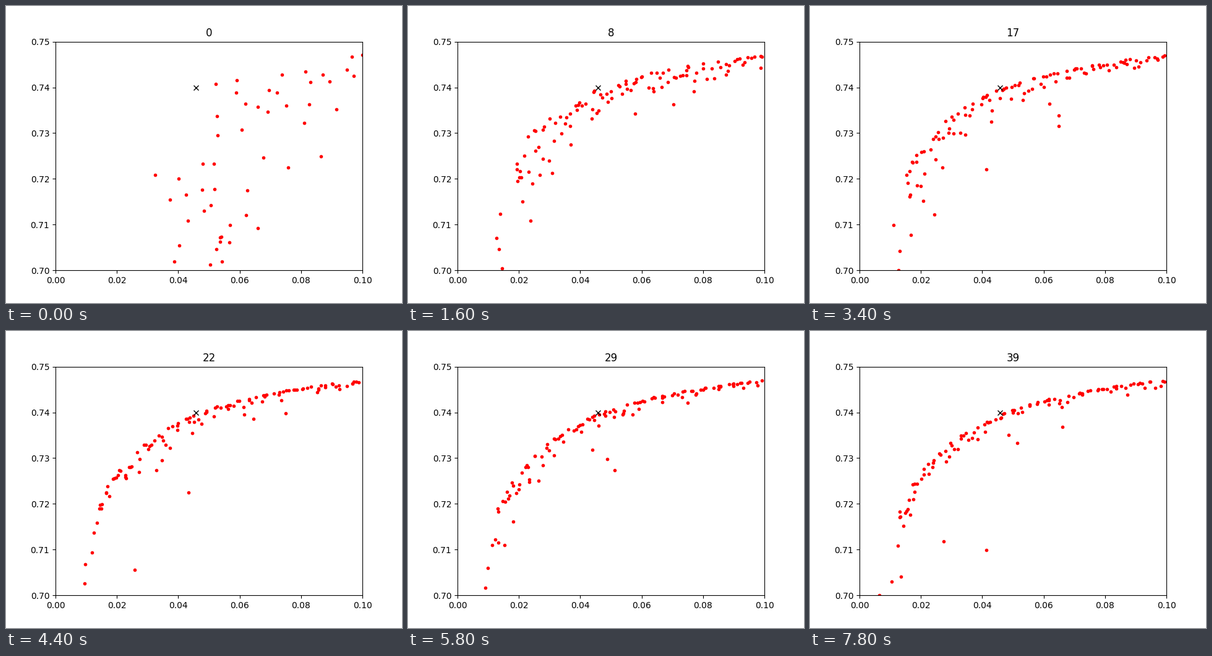
A matplotlib script that plays this animation: 640x480 px, repeating every 8 s.

```python
import numpy as np
import matplotlib.pyplot as plt
from matplotlib.animation import FuncAnimation

GENERATIONS = 40
INTERVAL = 200


def front(x):
    return 0.755 - 0.000878 / (x + 0.0112)


def inverse_front(y):
    return 0.000878 / (0.755 - y) - 0.0112


def slope(x):
    return 0.000878 / (x + 0.0112) ** 2


def spaced(rng, count, low, high):
    """Random values that cover the range without large gaps."""
    steps = (np.arange(count) + rng.uniform(-1, 2, count)) / count
    return low + (high - low) * np.clip(steps, 0, 1)


def first_population(rng):
    low_x = rng.normal(0.048, 0.008, 21)
    low_y = spaced(rng, 21, 0.7, 0.721)
    high_x = spaced(rng, 30, 0.047, 0.1)
    high_y = front(high_x) - rng.exponential(0.006, 30)
    return np.append(low_x, high_x), np.append(low_y, high_y)


def band(rng, gen):
    count = int(50 + 55 * (1 - np.exp(-gen / 3)))
    left = 0.012 + 0.013 * np.exp(-gen / 12) + 0.012 * np.exp(-gen / 2)
    spread = 0.0007 + 0.0045 * np.exp(-gen / 9) + 0.006 * np.exp(-gen / 2)
    x = left + (0.1 - left) * spaced(rng, count, 0, 1) ** 1.2
    y = front(x) - rng.exponential(spread, count) * (0.4 + 2 * slope(x))
    return x, y


def left_tail(rng, gen):
    y = spaced(rng, 5, 0.7, 0.718)
    shift = 0.0015 + 0.006 * np.exp(-gen / 10)
    return inverse_front(y) + shift + rng.exponential(0.003, 5), y


def stragglers(rng):
    x = spaced(rng, 6, 0.02, 0.075)
    return x, front(x) - 0.002 - rng.exponential(0.015, 6) * slope(x) / 0.4


def population(gen):
    rng = np.random.default_rng(100 + gen)
    if gen == 0:
        return first_population(rng)
    parts = band(rng, gen), left_tail(rng, gen), stragglers(rng)
    return np.concatenate(parts, axis=1)


fig, ax = plt.subplots(figsize=(6.4, 4.8), dpi=100)
ax.set_xlim(0, 0.1)
ax.set_ylim(0.7, 0.75)
dots, = ax.plot([], [], "r.")
ax.plot(0.0458, 0.74, "kx")
title = ax.set_title("0")


def update(gen):
    dots.set_data(*population(gen))
    title.set_text(str(gen))
    return dots, title


anim = FuncAnimation(fig, update, frames=GENERATIONS, interval=INTERVAL,
                     init_func=lambda: update(0), repeat=True, repeat_delay=0)
plt.show()
```
